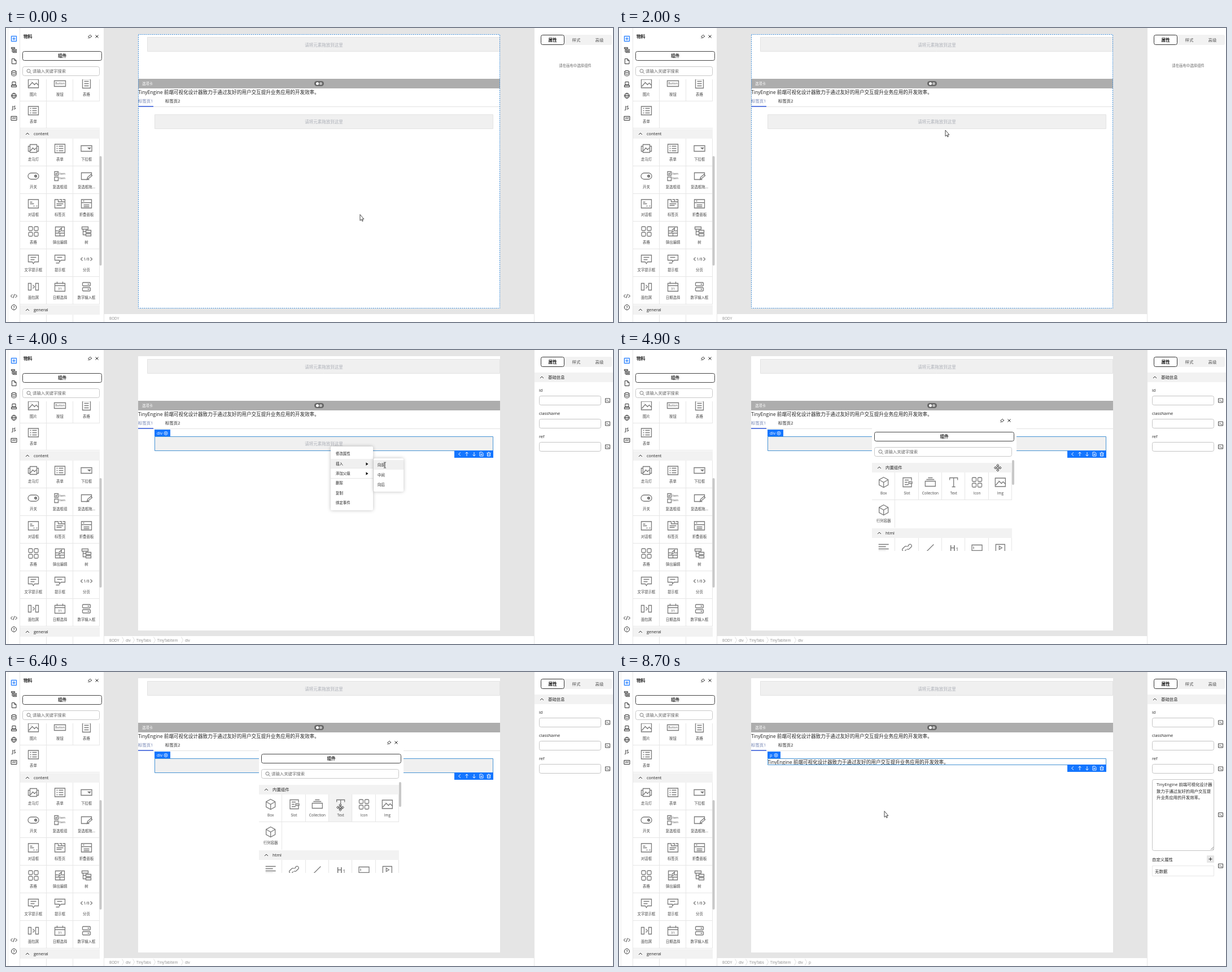
These frames come from a looping animation (1075x521 px, 8.8 s). An HTML page with a canvas:

```html
<!DOCTYPE html>
<html lang="zh">
<head>
<meta charset="utf-8">
<style>
html, body { margin: 0; width: 100%; height: 100%; overflow: hidden; background: #fff; }
canvas { display: block; }
</style>
</head>
<body>
<canvas id="stage" width="1075" height="521"></canvas>
<script>
const c = document.getElementById('stage').getContext('2d');
const LOOP = 8800, BLUE = '#1476ff', HEADER = '#f2f2f2', LINE = '#e6e6e6';
const FONT = '"Open Sans", "Noto Sans CJK SC", "Noto Sans CJK", sans-serif';
const SLOGAN = 'TinyEngine 前端可视化设计器致力于通过友好的用户交互提升业务应用的开发效率。';
const PLACEHOLDER = '请将元素拖放到这里';

// Moments (ms) at which the interface switches state
const SELECT = 2300, SUBMENU = 3300, DIALOG = 4600, INSERT = 6600, SELECT_TEXT = 8000;

// Pointer route: time, x, y
const ROUTE = [
  [200, 627, 331], [1200, 602, 266], [2100, 575, 171], [2900, 575, 171],
  [3300, 602, 200], [3900, 671, 204], [4700, 671, 204], [5500, 670, 223],
  [5700, 670, 223], [6300, 592, 240], [6700, 592, 240], [7300, 470, 247]
];

// Icons: path around (0, 0), then optional text items [text, x, y, size]
const FRAME = 'M-9-7.5h18v15h-18z';
const ICONS = {
  image: [FRAME + 'M-8 5l6-7 4 4 3-3 4 4M-4-4h.5'],
  button: ['M-10-5h20v10h-20z', ['Button', 0, 0, 5]],
  table: ['M-7-8h14v16h-14zM-4-4h8M-4 0h8M-4 4h8'],
  form: [FRAME + 'M-6-4h2M-2-4h8M-6 0h2M-2 0h8M-6 4h2M-2 4h8'],
  carousel: ['M-6-7h12v14h-12zM-6-4h-3v9h3M6-4h3v9h-3M-5 4l4-5 3 3 3-3'],
  select: ['M-9.5-5h19v10h-19zM3-1h4l-2 2z'],
  toggle: ['M-4-5.5h8a5.5 5.5 0 0 1 0 11h-8a5.5 5.5 0 0 1 0-11zM6 0a2 2 0 1 1-4 0a2 2 0 1 1 4 0M5 0a1 1 0 1 1-2 0a1 1 0 1 1 2 0'],
  checks: ['M-9.5-8h6.5v6.5h-6.5zM-9.5 1.5h6.5v6.5h-6.5zM-8-5l1.5 1.5 2-2.5', ['Item', 4, -4, 5], ['Item', 4, 4, 5]],
  edit: ['M5 6h-14v-12h18v7M1 6l1-4 6-5 2 2-6 5z'],
  dialog: [FRAME + 'M-6-3h4M-6 0h7M0 4h2M5 4h2'],
  tabs: ['M-9-7.5h6v4h12v11h-18zM-1-7.5h4v3M5-7.5h4v4M-6 0h12M-6 3h9'],
  collapse: [FRAME + 'M-9-2h18M-6-5h2M-5 2h10M-5 5h10'],
  grid: [[[-8.5, -8.5], [1.5, -8.5], [-8.5, 1.5], [1.5, 1.5]].map(([x, y]) =>
    `M${x + 1.5} ${y}h4a1.5 1.5 0 0 1 1.5 1.5v4a1.5 1.5 0 0 1-1.5 1.5h-4a1.5 1.5 0 0 1-1.5-1.5v-4a1.5 1.5 0 0 1 1.5-1.5z`).join('')],
  popedit: ['M-8-8h16v16h-16zM-8 3h16M0 3v5M-8-1h5M3-1h5M-2 1l1-4 4-3-1 5z'],
  tree: ['M-8-8h11v4h-11zM-1-2h9v4h-9zM-1 4h9v4h-9zM-6-4v10h5M-6 0h5'],
  tooltip: ['M-9-7h18v12h-7l-2 3-2-3h-7zM-5-3h10M-5 1h7'],
  hint: ['M-9-7h18v9h-7l-3 3v-3h-8zM-5-3h9M-7 7h6'],
  pages: ['M-7-3l-3 3 3 3M7-3l3 3-3 3', ['1/8', 0, 0, 7]],
  crumbs: ['M-9-6h5v12h-5zM4-6h5v12h-5zM-1-3l3 3-3 3'],
  date: ['M-9-6h18v14h-18zM-9-2h18M-5-9v4M5-9v4', ['31', 0, 3, 6]],
  number: ['M-6-7.5h12l1 1v4l-1 1h-12l-1-1v-4zM-6 1.5h12l1 1v4l-1 1h-12l-1-1v-4zM2-4.5h3M2 4.5h3'],
  cube: ['M0-9l8 4.5v9l-8 4.5-8-4.5v-9zM-8-4.5l8 4.5 8-4.5M0 0v9'],
  slot: ['M8 2v6h-15v-16h15v5M-4-4h7M-4 0h5M-4 4h7M3-1h6v3h-6z'],
  collection: ['M-9-2h18v9h-18zM-7-5h14M-4-8h8'],
  text: ['M-7-4v-4h14v4M0-8v16M-3 8h6'],
  lines: ['M-9-6h18M-9-2h13M-9 2h18M-9 6h13'],
  link: ['M-1 3l-3 3a3 3 0 0 1-4-4l4-4a3 3 0 0 1 4 0M1-2l3-4a3 3 0 0 1 4 4l-4 4a3 3 0 0 1-4 0'],
  slash: ['M-7 7l13-13'],
  heading: ['', ['H', -2, 0, 14], ['1', 6, 2.5, 8]],
  input: ['M-9-5h18v10h-18zM-6-2v4'],
  video: ['M-8-6h16v13h-16zM-2-3l5 3-5 3z'],
  search: ['M3 0a3 3 0 1 1-6 0a3 3 0 1 1 6 0M2 2l3 3'],
  close: ['M-2.5-2.5l5 5M2.5-2.5l-5 5'],
  pin: ['M0-3l3 3-2 .5-1.5 2.5-3-3 2.5-1.5zM-1.5 1.5l-2 2'],
  up: ['M-3 1.5l3-3 3 3'],
  next: ['M-1.5-5.5l3 5.5-3 5.5'],
  plus: ['M-3 0h6M0-3v6'],
  terminal: ['M-4-3.5h8v7h-8zM-2-1.5l1.5 1.5-1.5 1.5M.5 1.5h2'],
  gear: ['M3 0a3 3 0 1 1-6 0a3 3 0 1 1 6 0M1 0a1 1 0 1 1-2 0a1 1 0 1 1 2 0'],
  add: ['M-4.5-4.5h9v9h-9zM-2.5 0h5M0-2.5v5'],
  outline: ['M-4.5-4.5h6v2h-6zM-1-1h5.5v2h-5.5zM-1 2.5h5.5v2h-5.5zM-3-2.5v6h2M-3 0h2'],
  file: ['M-3.5-4.5h4.5l3 3v6h-7.5zM1-4.5v3h3'],
  database: ['M-4-3a4 1.7 0 1 1 8 0a4 1.7 0 1 1-8 0v6c0 2.5 8 2.5 8 0v-6M-4 0c0 2.5 8 2.5 8 0'],
  block: ['M-3-4.5h6v5h-6zM-3 .5l-1.5 1v3h9v-3l-1.5-1M-4.5 2h9'],
  globe: ['M4.5 0a4.5 4.5 0 1 1-9 0a4.5 4.5 0 1 1 9 0M-4.5 0h9M0-4.5c-3 3-3 6 0 9c3-3 3-6 0-9'],
  js: ['', ['JS', 0, 0, 8]],
  vars: ['M-5-3.5h10v7h-10z', ['VAR', 0, 0, 4]],
  code: ['M-2.5-3l-3 3 3 3M2.5-3l3 3-3 3M1-3.5l-2 7'],
  help: ['M4.5 0a4.5 4.5 0 1 1-9 0a4.5 4.5 0 1 1 9 0', ['?', 0, 0, 7]],
  left: ['M2-3l-3.5 3 3.5 3'],
  rise: ['M0 3.5v-7M-2.5-1l2.5-2.5 2.5 2.5'],
  fall: ['M0-3.5v7M-2.5 1l2.5 2.5 2.5-2.5'],
  copy: ['M-3-3.5h4l2 2v5h-6zM0-1v3M-1.5 .5h3'],
  trash: ['M-3.5-2h7M-1-3.5h2M-2.5-2v5.5h5v-5.5M-1 0v2M1 0v2']
};

const MATERIALS = [
  [81, 'image 图片', 'button 按钮', 'table 表格'],
  [129, 'form 表单'],
  [196, 'carousel 走马灯', 'form 表单', 'select 下拉框'],
  [245, 'toggle 开关', 'checks 复选框组', 'edit 复选框拖...'],
  [294, 'dialog 对话框', 'tabs 标签页', 'collapse 折叠面板'],
  [343, 'grid 表格', 'popedit 弹出编辑', 'tree 树'],
  [392, 'tooltip 文字提示框', 'hint 提示框', 'pages 分页'],
  [441, 'crumbs 面包屑', 'date 日期选择', 'number 数字输入框']
];

function rect(x, y, w, h, fill, stroke, radius = 0) {
  c.beginPath();
  if (stroke) c.roundRect(x + .5, y + .5, w - 1, h - 1, radius);
  else c.roundRect(x, y, w, h, radius);
  if (fill) { c.fillStyle = fill; c.fill(); }
  if (stroke) { c.strokeStyle = stroke; c.lineWidth = 1; c.stroke(); }
}

function text(s, x, y, size = 7.4, color = '#222', align = 'left', weight = 400) {
  c.font = `${weight} ${size}px ${FONT}`;
  c.textAlign = align;
  c.fillStyle = color;
  c.fillText(s, x, y + size * .37);
}

function icon(name, x, y, color = '#7a7a7a', width = 1.3) {
  const [path, ...labels] = ICONS[name];
  c.save();
  c.translate(x, y);
  c.strokeStyle = color;
  c.lineWidth = width;
  c.stroke(new Path2D(path));
  for (const [s, dx, dy, size] of labels) text(s, dx, dy, size, color, 'center', 600);
  c.restore();
}

function shadowBox(x, y, w, h) {
  c.save();
  c.shadowColor = 'rgba(0,0,0,.25)';
  c.shadowBlur = 6;
  rect(x, y, w, h, '#fff', null, 2);
  c.restore();
}

function clipped(x, y, w, h, draw) {
  c.save();
  c.beginPath();
  c.rect(x, y, w, h);
  c.clip();
  draw();
  c.restore();
}

function section(x, y, w, title) {
  rect(x, y, w, 17, HEADER);
  icon('up', x + 13, y + 8.5, '#333', 1);
  text(title, x + 24, y + 8.5);
}

function cell(x, y, w, item, hover) {
  const [name, label] = item.split(' ');
  if (hover) rect(x, y, w, 49, '#f3f3f3');
  rect(Math.round(x + w) - 1, y, 1, 49, LINE);
  icon(name, x + w / 2, y + 17.5);
  if (label) text(label, x + w / 2, y + 36.5, 6.4, '#444', 'center');
}

function searchBar(x, y, w) {
  rect(x, y, w, 17, '#fff', '#c8c8c8', 3);
  icon('search', x + 11, y + 8, '#777', .9);
  text('请输入关键字搜索', x + 18, y + 8.5, 7.4, '#666');
}

function groupButton(x, y, w) {
  rect(x, y, w, 17, '#fff', '#444', 3);
  text('组件', x + w / 2, y + 8.5, 7.6, '#222', 'center', 600);
}

function leftPanel() {
  rect(0, 0, 174, 521, '#fff');
  rect(3, 0, 1, 521, '#eee');
  rect(24, 0, 1, 521, LINE);
  rect(173, 0, 1, 521, LINE);
  rect(8, 13, 12, 12, '#e3eeff', null, 2);
  const tools = 'add 19,outline 39,file 59,database 80,block 100,globe 120,js 141,vars 160,code 475,help 495';
  for (const tool of tools.split(',')) {
    const [name, y] = tool.split(' ');
    icon(name, 14, +y, name === 'add' ? BLUE : '#333', 1);
  }
  text('物料', 31, 15, 7.8, '#222', 'left', 600);
  icon('pin', 149, 15, '#333', .9);
  icon('close', 161, 15, '#222', 1);
  groupButton(29, 41, 141);
  searchBar(29, 68, 137);
  clipped(25, 91, 149, 430, () => {
    for (const [y, ...items] of MATERIALS) {
      items.forEach((item, i) => cell(25 + 47 * i, y, 47, item));
      rect(25, y + 48, 141, 1, LINE);
    }
    section(25, 179, 141, 'content');
    section(25, 491, 141, 'general');
    rect(71, 508, 1, 13, LINE);
    rect(118, 508, 1, 13, LINE);
    rect(165.5, 227, 4, 194, '#c8c8c8', null, 2);
  });
}

function rightPanel(t) {
  rect(935, 0, 140, 521, '#fff');
  rect(935, 0, 1, 521, LINE);
  rect(947, 12, 126, 18, HEADER, null, 3);
  rect(947, 12, 42, 18, '#fff', '#333', 3);
  text('属性', 968, 21, 7.6, '#111', 'center', 600);
  text('样式', 1010, 21, 7.4, '#555', 'center');
  text('高级', 1051, 21, 7.4, '#555', 'center');
  if (t < SELECT) {
    text('请在画布中选择组件', 1008, 66.5, 6.4, '#666', 'center');
    return;
  }
  section(936, 40, 139, '基础信息');
  ['id', 'className', 'ref'].forEach((label, i) => {
    const y = 71 + 41 * i;
    text(label, 944, y);
    rect(944, y + 10, 110, 17, '#fff', '#c4c4c4', 3);
    icon('terminal', 1065.5, y + 18.5, '#333', .9);
  });
  if (t < SELECT_TEXT) return;
  rect(944, 190, 110, 127, '#fff', '#c4c4c4', 3);
  text(SLOGAN.slice(0, 19), 952, 199.5);
  text(SLOGAN.slice(19, 32), 952, 211);
  text(SLOGAN.slice(32), 952, 222.5);
  c.beginPath();
  c.moveTo(1048, 315); c.lineTo(1053, 310);
  c.moveTo(1051, 315); c.lineTo(1053, 313);
  c.strokeStyle = '#888';
  c.stroke();
  icon('terminal', 1065.5, 253, '#333', .9);
  text('自定义属性', 944, 332);
  rect(1041, 325, 13, 13, '#e6e6e6', null, 1);
  icon('plus', 1047.5, 331.5, '#333', 1);
  icon('terminal', 1065.5, 343.5, '#333', .9);
  rect(944, 343, 110, 19, '#fff', '#e6e6e6');
  text('无数据', 949, 353);
}

function breadcrumbs(t) {
  rect(174, 507, 761, 14, '#fff');
  text('BODY', 183, 514.5, 6.4, '#888');
  if (t < SELECT) return;
  const trail = [['div', 212], ['TinyTabs', 231], ['TinyTabItem', 268], ['div', 317]];
  if (t >= SELECT_TEXT) trail.push(['p', 336]);
  for (const [label, x] of trail) {
    icon('next', x - 5, 514, '#ddd', 1);
    text(label, x, 514.5, 6.4, '#888');
  }
}

function selection(t) {
  const isText = t >= SELECT_TEXT;
  const height = isText ? 12 : 26, tagWidth = isText ? 23 : 28;
  rect(263, 153, 600, height, null, '#4593d4');
  rect(263, 141, tagWidth, 12, BLUE);
  text(isText ? 'p' : 'div', 267, 147.5, 7.4, '#fff');
  icon('gear', 263 + tagWidth - 8, 147.5, '#fff', .8);
  const y = 152 + height;
  rect(794, y, 69, 13, BLUE);
  ['left', 'rise', 'fall', 'copy', 'trash'].forEach((name, i) =>
    icon(name, 803 + 13 * i, y + 6.5, '#fff', .9));
}

function page(t, x, y) {
  rect(174, 0, 761, 507, '#e5e5e5');
  rect(234, 11, 641, 486, '#fff');
  rect(250, 16, 625, 26, '#f0f0f0', '#e3e3e3');
  text(PLACEHOLDER, 563, 30, 7.5, '#adb0b8', 'center');
  rect(234, 90, 641, 17, '#adadad');
  text('选项卡', 241, 99, 6.4, '#fff');
  rect(546, 94, 17, 9, '#666', null, 4.5);
  rect(549, 96, 5, 5, '#fff', null, 2.5);
  rect(555, 96, 5, 5, '#bbb', null, 2.5);
  text(SLOGAN, 234, 113.5, 8.6);
  text('标签页1', 234, 129.5, 7.4, '#6a7cae');
  text('标签页2', 282, 129.5, 7.4, '#222');
  rect(234, 139, 641, 1, '#e2e2e2');
  rect(234, 138, 27, 2, '#5e7ce0');
  if (t < INSERT) {
    rect(263, 153, 600, 26, '#f0f0f0', '#e3e3e3');
    text(PLACEHOLDER, 563, 166, 7.5, '#adb0b8', 'center');
  } else {
    text(SLOGAN, 263, 159.5, 8.6);
  }
  if (t >= SELECT) {
    selection(t);
  } else {
    c.setLineDash([2, 1.5]);
    if (y < 179) rect(263, 153, 600, 26, null, '#3a8ad6');
    else rect(234, 11, 641, 486, null, '#3a8ad6');
    c.setLineDash([]);
  }
}

function menus(t, x, y) {
  const open = t >= SUBMENU;
  shadowBox(575, 171, 75, 113);
  if (open) rect(575, 193, 75, 17, '#f0f0f0');
  rect(575, 209, 75, 1, LINE);
  rect(575, 227, 75, 1, LINE);
  ['修改属性', '插入', '添加父级', '删除', '复制', '绑定事件'].forEach((label, i) =>
    text(label, 584, 184 + 17.3 * i, 6.4));
  c.fillStyle = '#111';
  for (const ay of [202, 219]) c.fill(new Path2D(`M637.5 ${ay - 2.7}l4 2.7-4 2.7z`));
  if (!open) return;
  shadowBox(651, 192, 53, 59);
  if (x > 651) rect(651, 195, 53, 17, '#f0f0f0');
  ['向前', '中间', '向后'].forEach((label, i) => text(label, 658, 204 + 17.2 * i, 6.4));
}

function dialog(x, y) {
  clipped(448, 119, 256, 237, () => {
    rect(448, 119, 256, 237, '#fff');
    icon('pin', 679, 125, '#333', .9);
    icon('close', 691, 125, '#222', 1);
    groupButton(452, 145, 248);
    searchBar(452, 172, 244);
    section(448, 200, 248, '内置组件');
    const width = 248 / 6;
    const row = (top, items) => items.split(',').forEach((item, i) => {
      const left = 448 + width * i;
      cell(left, top, width, item, y > top && y < top + 49 && x > left && x < left + width);
    });
    row(217, 'cube Box,slot Slot,collection Collection,text Text,grid Icon,image Img');
    rect(448, 265, 248, 1, LINE);
    row(266, 'cube 行列容器');
    section(448, 316, 248, 'html');
    row(333, 'lines,link,slash,heading,input,video');
    rect(696, 195, 4, 44, '#c8c8c8', null, 2);
  });
}

const POINTERS = {
  arrow: 'M0-.5v10.8l2.4-2.1 1.5 3.3 1.5-.7-1.5-3.2h3z',
  beam: 'M-2-5h1.5l.5.5.5-.5h1.5M0-4.5v9M-2 5h1.5l.5-.5.5.5h1.5',
  move: 'M0-6.5l2.2 2.5h-1.4v3.2h3.2v-1.4l2.5 2.2-2.5 2.2v-1.4h-3.2v3.2h1.4l-2.2 2.5-2.2-2.5h1.4v-3.2h-3.2v1.4l-2.5-2.2 2.5-2.2v1.4h3.2v-3.2h-1.4z'
};

function pointer(t, x, y) {
  const kind = t >= DIALOG && t < INSERT ? 'move' : t >= SUBMENU && t < DIALOG && x > 657 ? 'beam' : 'arrow';
  const path = new Path2D(POINTERS[kind]);
  c.save();
  c.translate(x, y);
  c.fillStyle = '#fff';
  c.strokeStyle = '#333';
  c.lineWidth = .9;
  if (kind !== 'beam') c.fill(path);
  c.stroke(path);
  c.restore();
}

function pointerAt(t) {
  const next = ROUTE.findIndex(([time]) => time > t);
  if (next === 0) return ROUTE[0].slice(1);
  if (next < 0) return ROUTE.at(-1).slice(1);
  const [t0, x0, y0] = ROUTE[next - 1], [t1, x1, y1] = ROUTE[next];
  const k = (t - t0) / (t1 - t0);
  return [x0 + (x1 - x0) * k, y0 + (y1 - y0) * k];
}

function draw(now) {
  const t = Math.floor(now % LOOP / 100) * 100;
  const [x, y] = pointerAt(t);
  page(t, x, y);
  breadcrumbs(t);
  leftPanel();
  rightPanel(t);
  if (t >= SELECT && t < DIALOG) menus(t, x, y);
  if (t >= DIALOG && t < INSERT) dialog(x, y);
  pointer(t, x, y);
  requestAnimationFrame(draw);
}
requestAnimationFrame(draw);
</script>
</body>
</html>
```
